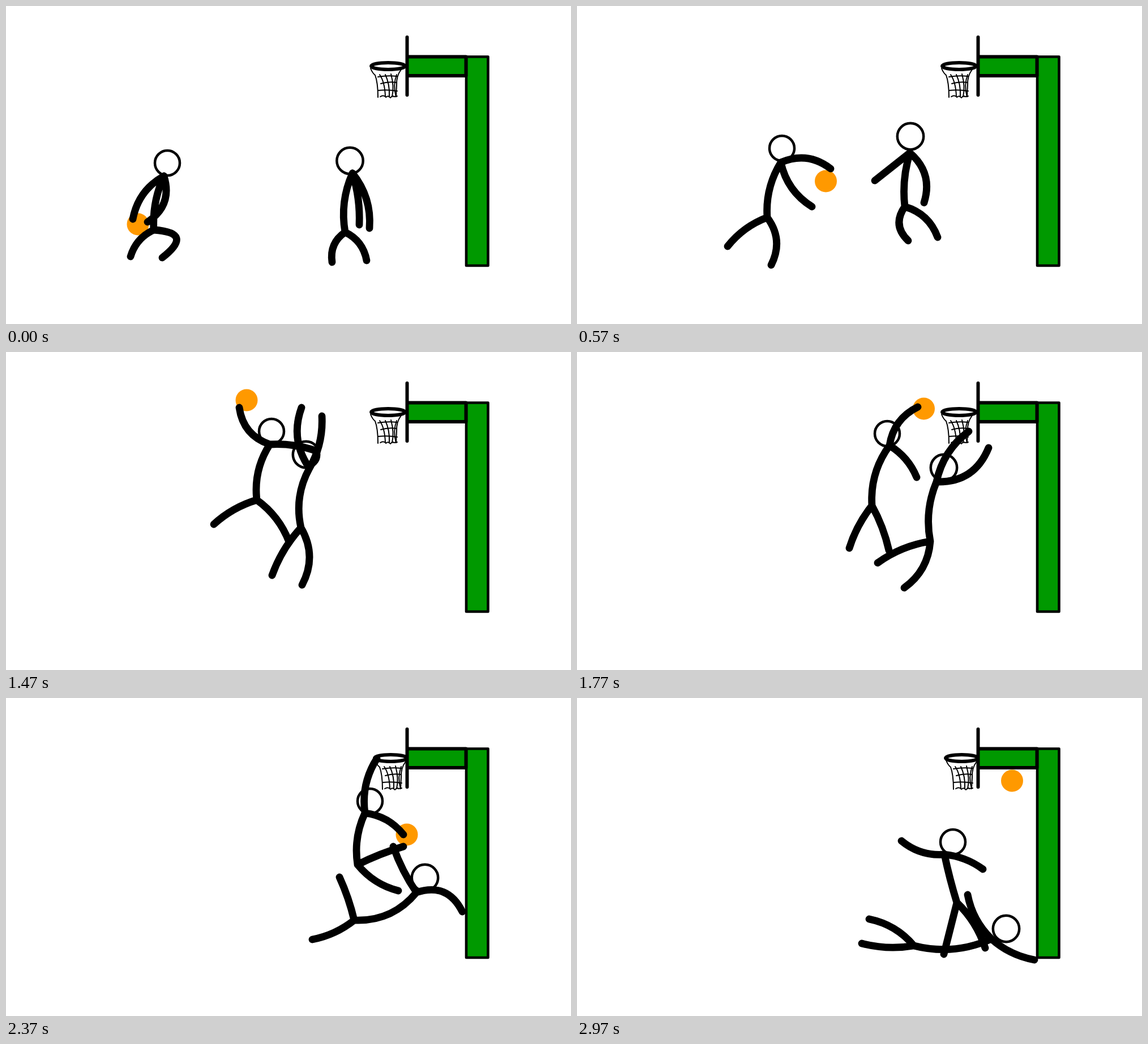
Animation, 998 px wide and 561 px high, one loop 3 s. Source, as an HTML page:

```html
<!DOCTYPE html>
<html lang="en">
<head>
<meta charset="utf-8">
<title>Stick figure dunk</title>
<style>
  html, body { margin: 0; width: 100%; height: 100%; overflow: hidden; background: #fff; }
  svg { display: block; width: 100%; height: 100%; }
  svg * { stroke: #000; stroke-linecap: round; stroke-linejoin: round; fill: none; }
  svg .ball { fill: #f90; stroke: none; }
  svg .pole { fill: #090; stroke-width: 4.6; }
  svg .beam { fill: #090; stroke: none; }
  .line { stroke-width: 6; }
  .net { stroke-width: 2; }
  .limbs { stroke-width: 12.8; }
  .head { stroke-width: 4.5; }
</style>
</head>
<body>
<svg viewBox="0 0 998 561">
  <circle id="ball" class="ball" r="19.5"/>
  <rect class="beam" x="709" y="89" width="104" height="34"/>
  <rect class="pole" x="813" y="89.5" width="38.5" height="368.5"/>
  <path class="line" d="M711 89.5H812.5V123H711M708.5 55V157"/>
  <g id="net" class="net">
    <path d="M644 110Q647 118 652 122Q657 135 657 161M698 112Q689 124 690 140L689 160"/>
    <path d="M660 121Q669 134 670 159M670 121Q678 138 677 159M680 120Q686 142 682 160M690 121Q683 140 689 160"/>
    <path d="M657 125Q674 122 691 124M662 137Q675 133 690 135M657 149Q675 147 691 150"/>
    <path d="M661 160Q667 156 671 161Q675 157 679 162Q683 157 685 160L691 159"/>
  </g>
  <ellipse id="rim" class="line" cx="675" cy="106" rx="30" ry="6"/>
  <g id="defender"><circle class="head" r="23.2"/><path class="limbs"/></g>
  <g id="runner"><circle class="head" r="22"/><path class="limbs"/></g>
</svg>
<script>
const $ = id => document.getElementById(id);

const linear = k => k;
const smooth = k => k * k * (3 - 2 * k);
const easeIn = k => k ** 1.6;
const easeOut = k => 1 - (1 - k) ** 1.8;
const swing = k => 1 - (1 - k) ** 3;

// A key: step, easing to the next key, height of the arc on the way, parts.
// Parts of a body: head, neck, hip, two hands, two feet;
// the third value is how far the spine, arm or leg bows sideways.
const runner = [
  [0, smooth, 0, [[285,277], [279,300], [261,395,-6], [224,376,-11], [250,381,16], [220,442,-7], [276,444,34]]],
  [4, linear, 0, [[362,251], [360,276], [336,373,-8], [448,287,13], [415,354,-10], [266,424,-6], [343,457,13]]],
  [6, easeOut, 0, [[399,213], [397,239], [372,333,-8], [430,155,12], [485,253,-10], [293,379,-2], [427,404,6]]],
  [9, linear, 0, [[469,140], [466,163], [443,261,-9], [412,98,13], [547,174,4], [367,304,-5], [500,335,7]]],
  [11, swing, 0, [[548,144], [552,165], [521,271,-10], [602,97,11], [600,221,6], [481,346,-4], [551,350,3]]],
  [15, easeIn, 0, [[643,182], [634,203], [621,294,-7], [655,107,9], [702,241,8], [702,262,2], [693,340,-7]]],
  [19, linear, 0, [[664,254], [649,276], [671,361,-1], [573,252,8], [717,302,5], [721,441,6], [648,452,0]]]
];
const defender = [
  [0, linear, 0, [[607.5,273], [612,295], [599,399,-8], [624,386,4], [642,392,10], [576,452,-9], [637,449,8]]],
  [1, linear, 0, [[607.5,273], [612,295], [600,396,-6], [545,340,-5], [697,330,5], [567,460,-10], [648,458,10]]],
  [4, linear, 0, [[589,230], [588,259], [579,354,-5], [526,308,0], [613,347,15], [585,414,-13], [637,408,10]]],
  [6, easeOut, -42, [[561,191], [566,218], [550,317,-7], [481,198,5], [490,278,12], [559,385,-8], [600,394,11]]],
  [9, linear, 20, [[530,181], [536,205], [521,310,-10], [522,98,14], [558,113,-7], [470,394,-5], [523,411,14]]],
  [11, swing, 8, [[648,204], [635,229], [624,334,-8], [692,140,10], [727,169,-19], [531,372,-6], [578,416,11]]],
  [15, easeIn, 0, [[740,317], [725,343], [615,392,15], [684,262,3], [806,377,19], [589,316,-2], [541,426,5]]],
  [19, linear, 0, [[758,407], [732,425], [595,437,12], [690,347,7], [808,462,-6], [516,390,-8], [503,433,5]]]
];
const ball = [
  [0, smooth, 80, [[233,385]]],
  [4, linear, 0, [[439.5,309]]],
  [6, easeOut, 0, [[446.5,157]]],
  [9, linear, -12, [[425,85]]],
  [11, linear, 0, [[612.5,100]]],
  [12, linear, 0, [[655,113]]],
  [15, linear, 0, [[708,241]]],
  [19, linear, 0, [[768.5,146]]]
];

// The parts of a track at one step.
function sample(track, step) {
  const i = track.findLastIndex(key => key[0] <= step);
  const [at, ease, arc, parts] = track[i];
  const [end, , , next] = track[i + 1] || [at + 1, , , parts];
  const t = (step - at) / (end - at), k = ease(t), rise = arc * Math.sin(Math.PI * t);
  return parts.map((part, p) => part.map((v, j) =>
    v + (next[p][j] - v) * k + (j === 1 ? rise : 0)));
}

// A limb whose middle lies `bow` pixels beside the straight line.
function limb([x0, y0], [x1, y1, bow]) {
  const dx = x1 - x0, dy = y1 - y0, push = 2 * bow / Math.hypot(dx, dy);
  return `M${x0} ${y0}Q${x0 + dx / 2 + dy * push} ${y0 + dy / 2 - dx * push} ${x1} ${y1}`;
}

function place(el, [x, y]) {
  el.setAttribute("cx", x);
  el.setAttribute("cy", y);
}

function drawBody(id, track, step) {
  const [headEl, limbsEl] = $(id).children;
  const [head, neck, hip, ...ends] = sample(track, step);
  place(headEl, head);
  limbsEl.setAttribute("d",
    limb(neck, hip) + ends.map((end, n) => limb(n < 2 ? neck : hip, end)).join(""));
}

const LOOP = 3000, STEP = 150, LEAD = 30, HOLD = 8, GRAB = 13;

function draw(step) {
  drawBody("runner", runner, step);
  drawBody("defender", defender, step);
  place($("ball"), sample(ball, step)[0]);
  const pulled = step >= GRAB;
  $("net").setAttribute("transform", `translate(${pulled ? 8 : 0})`);
  $("rim").setAttribute("cx", pulled ? 679.5 : 675);
  $("rim").setAttribute("rx", pulled ? 28.5 : 30);
}

const start = performance.now();
let shown = -1;
function tick() {
  const t = (performance.now() - start) % LOOP;
  const beat = Math.floor((t + LEAD) / STEP);
  const step = beat > HOLD ? beat - 1 : beat; // the top of the jump lasts two beats
  if (step !== shown) draw(shown = step);
  requestAnimationFrame(tick);
}
tick();
</script>
</body>
</html>
```
